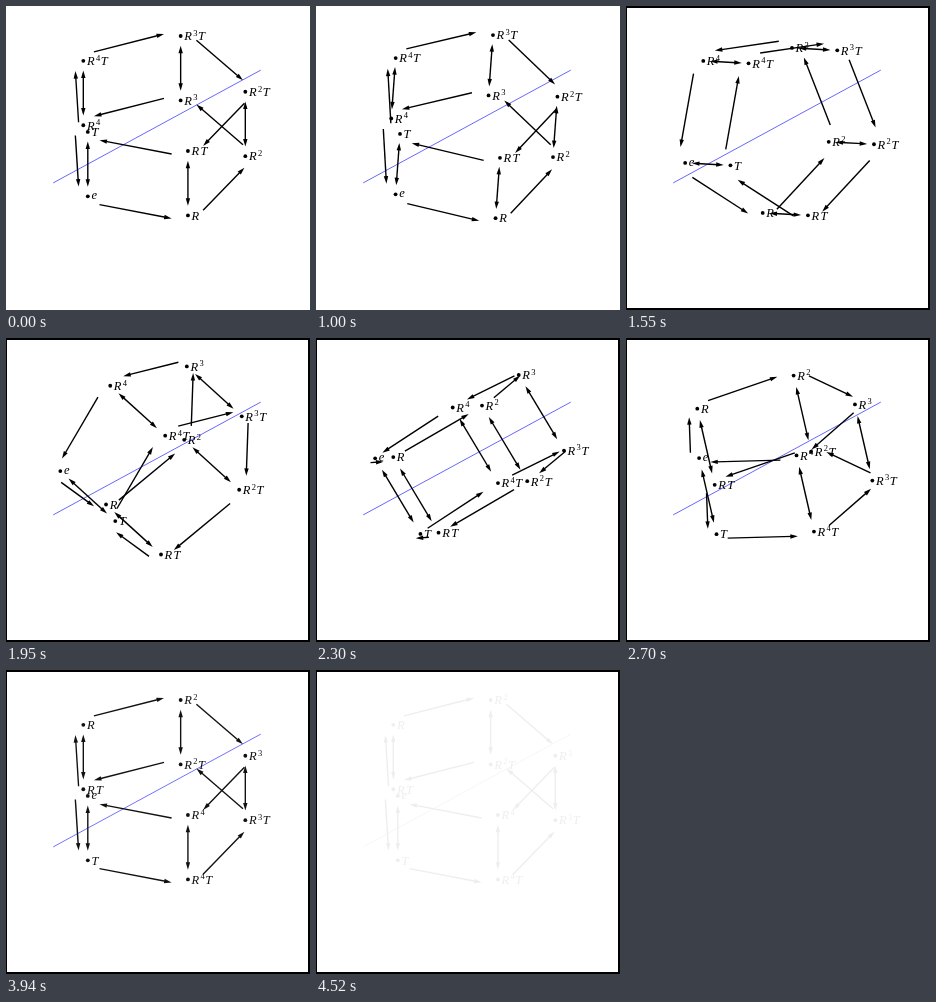
Animation of 304x304 px, one loop 4.93 s. Source, as an HTML page with a canvas:

```html
<!DOCTYPE html>
<html lang="en">
<head>
<meta charset="utf-8">
<title>Dihedral group prism</title>
<style>
  html, body { margin: 0; width: 100%; height: 100%; overflow: hidden; background: #fff; }
  canvas { display: block; width: 100%; height: 100%; }
</style>
</head>
<body>
<canvas></canvas>
<script>
const SIZE = 304, LOOP = 4930, TURN_START = 1000, TURN_STEPS = 39, FADE_START = 3940;
const canvas = document.querySelector('canvas');
const ctx = canvas.getContext('2d');
const ratio = window.devicePixelRatio || 1;
canvas.width = canvas.height = SIZE * ratio;

// Projected basis of the prism: along the axis, across it, and upwards
const CENTER = [151, 120.5], AXIS = [-69.2, 37.6], ACROSS = [55, 47.4], UP = [0, -32.2];
const HALF_HEIGHT = 0.5; // relative to the pentagon's radius

const mix = (p, q, a, b) => p.map((v, i) => a * v + b * q[i]);
const vertex = (i, side) => [Math.cos(i * Math.PI * 0.4), Math.sin(i * Math.PI * 0.4), side];

function project([x, y, z], angle) {
  const c = Math.cos(angle), s = Math.sin(angle);
  const across = y * c + z * HALF_HEIGHT * s;
  const up = z * c - y / HALF_HEIGHT * s;
  return CENTER.map((v, i) => v + AXIS[i] * x + ACROSS[i] * across + UP[i] * up);
}

function line(p, q, width, color) {
  ctx.strokeStyle = color;
  ctx.lineWidth = width;
  ctx.beginPath();
  ctx.moveTo(...p);
  ctx.lineTo(...q);
  ctx.stroke();
}

function arrow(p, q, bothEnds) {
  const dx = q[0] - p[0], dy = q[1] - p[1], length = Math.hypot(dx, dy);
  const ux = dx / length, uy = dy / length, head = 7.5, half = 2.2;
  const inset = ([x, y], d) => [x + ux * d, y + uy * d];
  const tip = ([x, y], dir) => {
    const [bx, by] = inset([x, y], -head * dir);
    ctx.beginPath();
    ctx.moveTo(x, y);
    ctx.lineTo(bx - uy * half, by + ux * half);
    ctx.lineTo(bx + uy * half, by - ux * half);
    ctx.fill();
  };
  line(bothEnds ? inset(p, 5) : p, inset(q, -5), 1.4, '#000');
  tip(q, 1);
  if (bothEnds) tip(p, -1);
}

function label([x, y], power, side) {
  const italic = 'italic 12.5px "Liberation Serif", serif';
  let pen = x + 3.6;
  const write = (text, font, rise, advance) => {
    ctx.font = font;
    ctx.fillText(text, pen, y - rise);
    pen += advance;
  };
  if (!power && side < 0) return write('e', italic, -3, 0);
  if (power) write('R', italic, -4.3, 9);
  if (power > 1) write(power, '8.5px "Liberation Serif", serif', 0.2, 4.8);
  if (side > 0) write('T', italic, -4.3, 0);
}

function drawPrism(angle) {
  const at = v => project(v, angle);
  ctx.fillStyle = '#000';
  line(at([1.5, 0, 0]), at([-1.5, 0, 0]), 0.6, '#00f');
  for (let i = 0; i < 5; i++) {
    const low = vertex(i, -1), high = vertex(i, 1);
    arrow(at(mix(low, high, 0.85, 0.15)), at(mix(low, high, 0.15, 0.85)), true);
    for (const side of [-1, 1]) {
      const a = vertex(i, side), b = vertex(i - side, side);
      const from = mix(a, b, 0.92, 0.2), to = mix(a, b, 0.2, 0.92);
      from[2] = to[2] = side;
      arrow(at(from), at(to));
      const p = at(a);
      ctx.beginPath();
      ctx.arc(...p, 1.9, 0, 7);
      ctx.fill();
      label(p, i, side);
    }
  }
}

function drawBorder() {
  ctx.fillStyle = '#000';
  ctx.fillRect(0, 0, SIZE, 2);
  ctx.fillRect(0, SIZE - 2, SIZE, 2);
  ctx.fillRect(0, 0, 1, SIZE);
  ctx.fillRect(SIZE - 2, 0, 2, SIZE);
}

// The first fade step is shorter than the rest
function fadeStep(t) {
  if (t < FADE_START) return 0;
  if (t < FADE_START + 20) return 1;
  return Math.min(14, 2 + Math.floor((t - FADE_START - 20) * 12 / 500));
}

function render(t) {
  const step = t < TURN_START ? 0 : Math.min(TURN_STEPS, 1 + Math.floor((t - TURN_START) / 50));
  ctx.setTransform(ratio, 0, 0, ratio, 0, 0);
  ctx.fillStyle = '#fff';
  ctx.fillRect(0, 0, SIZE, SIZE);
  drawPrism(Math.PI * step / TURN_STEPS);
  ctx.fillStyle = `rgba(255, 255, 255, ${fadeStep(t) / 15})`;
  ctx.fillRect(0, 0, SIZE, SIZE);
  if (step > 1) drawBorder();
}

const start = performance.now();
function tick() {
  render((performance.now() - start) % LOOP);
  requestAnimationFrame(tick);
}
tick();
</script>
</body>
</html>
```
